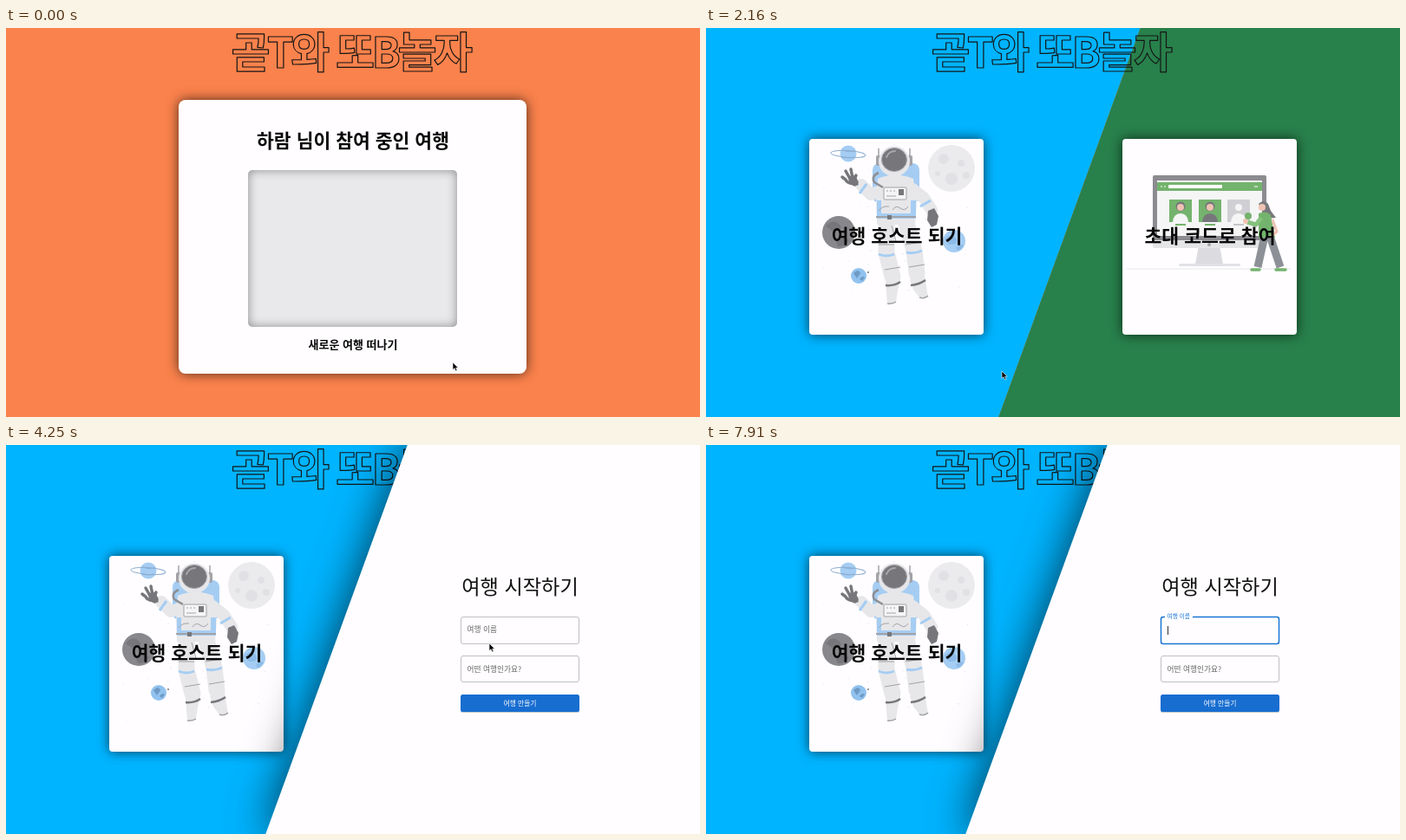
Recreate the animation shown at these times as an HTML page. Size 800 by 449 pixels, loop 8000 ms.

```html
<!DOCTYPE html>
<html lang="ko">
<head>
<meta charset="utf-8">
<title>여행 시작하기</title>
<style>
  html, body { margin: 0; width: 100%; height: 100%; overflow: hidden; }
  #stage { position: relative; width: 800px; height: 449px; overflow: hidden; background: #fa824c; }
  #stage > *, .box svg { position: absolute; }
  svg { display: block; overflow: visible; font-family: "Noto Sans CJK KR", "Noto Sans CJK", "Noto Sans", sans-serif; }
  .full { left: 0; top: 0; width: 800px; height: 449px; }
  .slab { top: 0; height: 449px; }
  .box { background: #fffdff; box-shadow: 0 0 14px rgba(0,0,0,.68); }
  .box svg { left: 0; top: 0; width: 100%; height: 100%; }
  .card { top: 128px; width: 200.5px; height: 225.5px; border-radius: 4px; }
  .inset { position: absolute; left: 80px; top: 81px; width: 241px; height: 181px; border-radius: 5px;
           background: #e9e8ea; box-shadow: inset 0 0 12px rgba(0,0,0,.4); }
  #blue { left: -600px; width: 1018.5px; background: #00b4ff; }
  #green { left: 418.5px; width: 900px; background: #28804b; }
  #white { left: 380.5px; width: 854px; background: #fffdff; box-shadow: 0 0 50px rgba(0,0,0,.7); }
  #main { left: 199px; top: 83px; width: 401px; height: 316px; border-radius: 8px; }
  .bold { font-weight: 700; text-anchor: middle; fill: #080808; }
  .title { font: 900 49px "Noto Sans CJK KR", "Noto Sans CJK", sans-serif; letter-spacing: -3.5px; text-anchor: middle;
           fill: none; stroke: #151515; stroke-width: 1.2; stroke-linejoin: round; }
  .suit { fill: #e7e7ea; } .sky { fill: #a5cdf3; } .dark { fill: #77777b; } .leaf { fill: #74b36d; }
  .mid { fill: #a2a2a7; } .pale { fill: #f5f5f6; }
  .line { fill: none; stroke: #a2a2a7; stroke-width: 1; }
  .limb { fill: none; stroke: #e7e7ea; stroke-linecap: round; stroke-linejoin: round; }
</style>
</head>
<body>
<div id="stage">
  <div id="blue" class="slab"></div>
  <div id="green" class="slab"></div>

  <svg class="full" viewBox="0 0 800 449"><text class="title" x="397" y="45.500">곧T와 또B놀자</text></svg>

  <div id="host" class="box card" style="left:119px">
    <svg viewBox="119 128 200.500 225.500">
      <g id="stars" fill="#dedee3"></g>
      <circle class="sky" cx="164" cy="145" r="9.5"/>
      <path d="M157 141q8 3 15 1M156 149q8 2 15 0" stroke="#86afd8" fill="none"/>
      <ellipse class="line" cx="164" cy="145.500" rx="20" ry="4" transform="rotate(4 164 145)" style="stroke:#8faed0"/>
      <circle cx="283" cy="162" r="27" fill="#ebebee"/>
      <g fill="#e1e1e5">
        <circle cx="274" cy="151" r="6"/><circle cx="294" cy="156" r="4"/><circle cx="283" cy="174" r="7"/>
        <circle cx="267" cy="168" r="3"/><circle cx="300" cy="170" r="4"/>
      </g>
      <circle cx="153" cy="236" r="19" fill="#87878c"/>
      <path d="M138 229q8-9 15-3t-6 9zM150 247q9-8 15-2-5 8-13 7z" class="dark"/>
      <circle class="sky" cx="286" cy="246" r="13"/>
      <path d="M275 243q8-7 13 0t-8 7zM288 254q5-6 9-3-3 5-7 6z" fill="#8ebbe8"/>
      <circle cx="176" cy="286" r="9" fill="#91c2ef"/>
      <path d="M170 283q6-6 8 0l-4 6zM177 290q3-5 6-2l-3 4z" fill="#6f9ac5"/>
      <circle class="dark" cx="187" cy="282" r="1"/>

      <!-- astronaut -->
      <rect class="sky" x="192" y="156" width="54" height="46" rx="8"/>
      <path class="line" d="M199 139v13M235 139v13" style="stroke-width:1.500"/>
      <path class="limb" stroke-width="14" d="M203 188l-13 4-11-11"/>
      <path class="limb" stroke-width="14" d="M238 186l13 10 9 14"/>
      <path d="M177 191l8-11M247 206l12-7" stroke="#a5cdf3" stroke-width="3"/>
      <path d="M174 180l-8-1q-4-1-5-4l-4-3m9 2l-5-9m8 8l-2-10m4 12l2-5" stroke="#77777b" stroke-width="3.500" fill="none" stroke-linecap="round"/>
      <path class="dark" d="M164 171l8-1 4 8-4 5-7-3z"/>
      <path class="dark" d="M256 211l7-3 5 9-2 10-6 3-5-8z"/>
      <path class="limb" stroke-width="19" d="M208 225l0 34 7 28"/>
      <path class="limb" stroke-width="19" d="M231 225l9 32 3 26"/>
      <path d="M214 228l5 18M199 250h18M230 250l18-3M206 279l18-3M234 276l18-3" class="line"/>
      <path d="M199 261q9 4 18 0M231 259q9 2 18-2" stroke="#a5cdf3" stroke-width="3" fill="none"/>
      <path class="suit" d="M207 292l17-2-3 13-2 13q-4 3-10 2l-1-11zM235 290l17-4 2 12 2 12q-5 4-10 1l-7-9z"/>
      <path d="M207 297q10 1 17-4M236 297q10-1 17-6" stroke="#77777b" stroke-width="2.500" fill="none"/>
      <path d="M209 318q6 1 10-2M246 311q6 2 10-2" stroke="#a2a2a7" stroke-width="1.500" fill="none"/>
      <path class="suit" d="M198 174q20-9 41 0l4 28-2 25h-44l-1-25z"/>
      <path class="sky" d="M197 199h5v15h34v-15h6v21h-45z"/>
      <path d="M196 218h46" stroke="#a2a2a7" stroke-width="2"/>
      <rect class="dark" x="209" y="216" width="5" height="5"/>
      <rect class="pale" x="205" y="184" width="26" height="14" rx="1" stroke="#a2a2a7"/>
      <rect class="dark" x="222" y="186" width="6" height="7"/>
      <path class="line" d="M208 188h2m2 0h2m2 0h2M208 194h11M199 211q4-6 12-5m4 4q4-6 9-2t9-2"/>
      <path d="M199 167q-9 4-5 11l10 6" stroke="#8e8e94" stroke-width="2.500" fill="none"/>
      <rect class="mid" x="196" y="147" width="6" height="12" rx="2"/>
      <rect class="mid" x="232" y="147" width="6" height="12" rx="2"/>
      <ellipse class="suit" cx="217" cy="154" rx="18" ry="17.500"/>
      <ellipse class="dark" cx="217" cy="152" rx="14.500" ry="13.500" stroke="#a2a2a7"/>
      <path d="M208 149q3-7 10-7" stroke="#a8a8ac" stroke-width="2" fill="none" stroke-linecap="round"/>
      <text class="bold" x="220" y="248" font-size="21.5">여행 호스트 되기</text>
    </svg>
  </div>

  <div id="guest" class="box card" style="left:480px">
    <svg viewBox="480 128 200.500 225.500">
      <path class="line" d="M485 278h189" style="stroke:#e6e6ea"/>
      <path fill="#dcdce0" d="M568 251h24l4 22h-32z"/>
      <rect fill="#e2e2e6" x="545" y="272" width="71" height="3" rx="1.500"/>
      <rect fill="#8b8b90" x="515" y="170" width="131" height="76" rx="2"/>
      <path fill="#e5e5e8" d="M515 245h131v7q0 2-2 2h-127q-2 0-2-2z"/>
      <circle class="mid" cx="580" cy="250" r="2"/>
      <rect class="pale" x="520" y="176" width="121" height="64"/>
      <path class="leaf" d="M520 178h121v10h-121z"/>
      <rect fill="#fff" x="533" y="181" width="62" height="4" rx="1"/>
      <path d="M524 183h2m2 0h2M632 183h4" stroke="#fff"/>
      <g id="photos"></g>

      <!-- visitor -->
      <path d="M644 240l-8 36M650 240l12 36" stroke="#8d9197" stroke-width="9" fill="none"/>
      <path d="M629 279h9M657 279h11" stroke="#74b36d" stroke-width="3.500" stroke-linecap="round"/>
      <path class="dark" d="M637 203q6-6 11 0l3 8 6 8-12 1z"/>
      <circle fill="#efc3b2" cx="641" cy="207" r="4"/>
      <path class="leaf" d="M637 214q9-4 14 2l5 26h-19z"/>
      <path d="M640 219l-6 8-10-3" stroke="#86c17e" stroke-width="5" fill="none" stroke-linejoin="round"/>
      <path d="M653 221l5 14-8 7" stroke="#efc3b2" stroke-width="3" fill="none"/>
      <circle fill="#efc3b2" cx="622" cy="223" r="3"/>
      <circle class="leaf" cx="625" cy="217" r="4"/>
      <text class="bold" x="581" y="248" font-size="21.6">초대 코드로 참여</text>
    </svg>
  </div>

  <div id="main" class="box">
    <div class="inset"></div>
    <svg viewBox="199 83 401 316">
      <text class="bold" x="400" y="137.500" font-size="21.5">하람 님이 참여 중인 여행</text>
      <text class="bold" x="400" y="369.500" font-size="13">새로운 여행 떠나기</text>
    </svg>
  </div>

  <div id="white" class="slab"></div>

  <svg id="form" class="full" viewBox="0 0 800 449">
    <text x="592.500" y="172" font-size="23.2" text-anchor="middle" fill="#111">여행 시작하기</text>
    <rect id="field" x="524.500" y="198.500" width="136" height="31" rx="2.500" fill="none"/>
    <rect id="notch" x="529" y="196" width="32" height="4" fill="#fffdff"/>
    <text id="label">여행 이름</text>
    <path id="caret" d="M532.500 209v10" stroke="#333"/>
    <rect x="524.500" y="243.500" width="136" height="30" rx="2.500" fill="none" stroke="#c0bfc1"/>
    <text x="531.500" y="261.500" font-size="8.7" fill="#666">어떤 여행인가요?</text>
    <rect x="524" y="289" width="137" height="20" rx="2.500" fill="#000" opacity=".22"/>
    <rect x="524" y="288" width="137" height="20" rx="2.500" fill="#176dd0"/>
    <text x="592.500" y="301" font-size="7.8" font-weight="500" text-anchor="middle" fill="#fff">여행 만들기</text>
  </svg>

  <svg id="pointer" class="full" viewBox="0 0 800 449">
    <path id="arrow" d="M0 0v8.500l2-1.800 1.500 3.300 1.500-.7-1.400-3.100h2.700z" fill="#000" stroke="#fff" stroke-width=".6"/>
    <path id="beam" d="M-2-4q2 0 2 1 0-1 2-1M0-3v7M-2 5q2 0 2-1 0 1 2 1M-1 1h2" fill="none" stroke="#222" stroke-width=".9"/>
  </svg>
</div>

<script>
const LOOP = 8000, ENTER = 916, SWEEP = 2823, FOCUS = 4700, HIDE_POINTER = 6750;
const $ = id => document.getElementById(id);
const clamp = v => Math.min(1, Math.max(0, v));
const mix = (a, b, p) => a + (b - a) * p;

// CSS-style cubic-bezier timing function
function bezier(x1, y1, x2, y2) {
  const curve = (a, b, s) => 3 * (1 - s) ** 2 * s * a + 3 * (1 - s) * s * s * b + s ** 3;
  return x => {
    let lo = 0, hi = 1;
    for (let i = 0; i < 24; i++) {
      const s = (lo + hi) / 2;
      if (curve(x1, x2, s) < x) lo = s; else hi = s;
    }
    return curve(y1, y2, hi);
  };
}
const ease = bezier(.25, .1, .25, 1);
const decelerate = bezier(0, 0, .2, 1);
const progress = (t, start, duration, easing = ease) => easing(clamp((t - start) / duration));

// Pointer stops: time, x, y
const stops = [[80, 515, 386], [800, 395, 361], [1400, 393, 361], [2100, 341, 396], [2250, 341, 396],
  [2750, 220, 281], [3350, 220, 281], [4200, 557, 229], [4300, 557, 229], [4600, 558, 212]];

function pointerAt(t) {
  const next = stops.findIndex(s => s[0] > t);
  if (next === 0) return stops[0].slice(1);
  if (next < 0) return stops.at(-1).slice(1);
  const a = stops[next - 1], b = stops[next];
  const u = (t - a[0]) / (b[0] - a[0]), p = u * u * (3 - 2 * u);
  return [mix(a[1], b[1], p), mix(a[2], b[2], p)];
}

function decorate() {
  let seed = 7;
  const random = () => (seed = seed * 16807 % 2147483647) / 2147483647;
  $('stars').innerHTML = Array.from({ length: 45 }, () =>
    `<circle cx="${125 + random() * 188}" cy="${134 + random() * 185}" r="${.3 + random() * .4}"/>`).join('');
  $('photos').innerHTML = [534, 568, 601].map((x, i) => {
    const known = i < 2;
    return `<g transform="translate(${x} 198)">
      <rect width="26" height="26" fill="${known ? '#74b36d' : '#d0d0d4'}"/>
      ${known ? '<circle cx="13" cy="8" r="5.500" fill="#77777b"/>' : ''}
      <circle cx="13" cy="9" r="4" fill="${known ? '#efc3b2' : '#f5f5f6'}"/>
      <path d="M4 26q1-10 9-10t9 10z" fill="${['#f5f5f6', '#77777b', '#f5f5f6'][i]}"/>
      <rect x="7" y="28" width="12" height="2" fill="${known ? '#74b36d' : '#c5c5ca'}"/></g>`;
  }).join('');
}

function slideSlab(id, distance, p) {
  $(id).style.transform = `translateX(${distance * (1 - p)}px) skewX(-20deg)`;
}

function render(t) {
  const enter = progress(t, ENTER, 1000);
  slideSlab('blue', -505, progress(t, ENTER, 770));
  slideSlab('green', 505, progress(t, ENTER, 840));
  slideSlab('white', -1420, progress(t, SWEEP, 1000));
  $('main').style.transform = `translateY(${449 * enter}px)`;
  for (const [id, distance] of [['host', -632], ['guest', 632]]) {
    $(id).style.transform = `translateX(${distance * (1 - enter)}px)`;
    $(id).style.opacity = enter;
  }

  $('form').style.opacity = progress(t, 3450, 400);
  const focused = t >= FOCUS, lift = progress(t, FOCUS, 200, decelerate);
  const label = $('label');
  label.setAttribute('transform', `translate(531.5 ${mix(216, 200, lift)})`);
  label.setAttribute('font-size', mix(8.7, 6.7, lift));
  label.setAttribute('fill', focused ? '#1976d2' : '#666');
  $('field').setAttribute('stroke', focused ? '#1976d2' : '#c0bfc1');
  $('field').setAttribute('stroke-width', focused ? 1.5 : 1);
  $('notch').style.opacity = lift;
  $('caret').style.opacity = focused && Math.floor((t - FOCUS) / 500) % 2 === 0 ? 1 : 0;

  const [x, y] = pointerAt(t), typing = t > 4400;
  for (const id of ['arrow', 'beam']) $(id).setAttribute('transform', `translate(${x} ${y})`);
  $('arrow').style.opacity = typing ? 0 : 1;
  $('beam').style.opacity = typing && t < HIDE_POINTER ? 1 : 0;
}

function frame() {
  render(performance.now() % LOOP);
  requestAnimationFrame(frame);
}
decorate();
frame();
</script>
</body>
</html>
```
